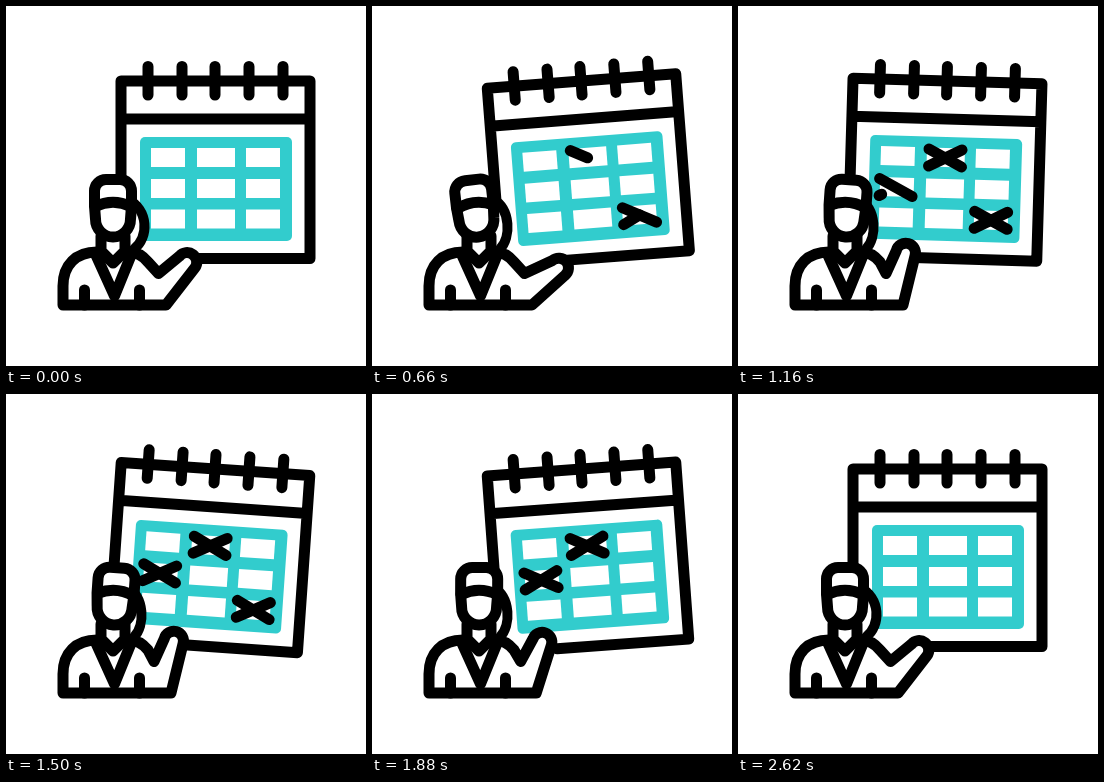
Write an HTML page that moves like this. It is 360 by 360 pixels and loops after 3 s.

```html
<!DOCTYPE html>
<html lang="en">
<head>
<meta charset="utf-8">
<title>Planning calendar</title>
<style>
html, body { margin: 0; width: 100%; height: 100%; overflow: hidden; background: #fff; }
svg { display: block; width: 100vw; height: 100vh; }
.line { fill: none; stroke: #000; stroke-width: 11; stroke-linecap: round; stroke-linejoin: round; }
.solid { fill: #fff; }
#ponytail { stroke-width: 10; }
</style>
</head>
<body>
<svg viewBox="0 0 360 360">
  <g id="calendar">
    <path class="line" d="M115 190V75H304V252.500H172M115 113H304"/>
    <path class="line" id="rings"/>
    <rect x="134" y="131" width="152" height="104" rx="5" fill="#32cccd"/>
    <g id="cells" fill="#fff"></g>
    <g id="marks"></g>
  </g>
  <g id="woman">
    <path class="line solid" id="body"/>
    <path class="line" d="M78.500 284V299M133.500 284V299"/>
    <path class="line solid" id="ponytail"/>
    <path class="line solid" d="M95 230V245L107 257L119 245V230"/>
    <path class="line" d="M89 247L108.500 290L126 247"/>
    <g id="head">
      <path class="line solid" d="M88.500 200V185A11.500 11.500 0 0 1 100 173.500H114A11.500 11.500 0 0 1 125.500 185V200L124.500 213A17.500 18 0 0 1 89.500 213Z"/>
      <path class="line" d="M89 200.500Q107 192 125 200.500"/>
    </g>
  </g>
</svg>
<script>
const LOOP = 3000;
const $ = id => document.getElementById(id);
const clamp = v => Math.min(1, Math.max(0, v));
const ease = p => p * p * (3 - 2 * p);
const ramp = (t, start, length) => ease(clamp((t - start) / length));

function add(parent, name, attrs) {
  const el = document.createElementNS("http://www.w3.org/2000/svg", name);
  for (const key in attrs) el.setAttribute(key, attrs[key]);
  return parent.appendChild(el);
}

// Keys are [time, value] pairs with an eased move between neighbours.
function track(t, keys) {
  let value = keys[0][1];
  for (let i = 1; i < keys.length; i++) {
    const [start, from] = keys[i - 1], [end, to] = keys[i];
    if (t >= start) value = from + (to - from) * ramp(t, start, end - start);
  }
  return value;
}

const swing = [[220, 0], [780, -5], [1400, 5], [1890, -4.2], [2390, 0]];
const nod = [[220, 0], [650, -6.5], [1120, 4], [1680, 4], [2160, -6], [2600, 0]];
const wave = [[220, 38], [640, 50], [1120, 15], [1720, 15], [2360, 38]];
const sway = [[220, 4], [600, 0], [2200, 0], [2600, 4]];

$("rings").setAttribute("d", [142, 176, 209, 243, 277].map(x => `M${x} 60.500V89`).join(""));
for (const y of [142, 173, 203.5])
  for (const [x, width] of [[145, 34], [191, 38], [240, 34]])
    add($("cells"), "rect", { x, y, width, height: 19 });

const STEP = 300;
const marks = [
  { x: 257, y: 213, hide: 1620 },
  { x: 209.5, y: 152, hide: 2220 },
  { x: 161, y: 183, hide: 2360 }
].map((mark, i) => ({
  ...mark,
  start: 210 + i * STEP,
  strokes: [-1, 1].map(side => ({ side, el: add($("marks"), "path", { class: "line" }) }))
}));

function drawMarks(t) {
  for (const { x, y, start, hide, strokes } of marks)
    strokes.forEach(({ side, el }, i) => {
      const p = ramp(t, start + i * STEP, STEP) * (1 - ramp(t, hide, 220));
      el.style.display = p > 0.005 ? "" : "none";
      el.setAttribute("d", `M${x - 16.5} ${y + side * 8.5}l${33 * p} ${-side * 17 * p}`);
    });
}

function drawBody(degrees) {
  const a = degrees * Math.PI / 180, s = Math.sin(a), c = Math.cos(a);
  const open = clamp((degrees - 15) / 23);
  const r = 9.7, reach = 41.5 - 2.5 * open;
  const hx = 157 + reach * s, hy = 287 - reach * c;
  const elbow = 148 + 4.5 * open, corner = 165 - 5 * open;
  $("body").setAttribute("d",
    `M57 299V280C57 259 70 246 91 246H122C132 246 138 251 142 256L${elbow} 267.5` +
    `L${hx - r * c} ${hy - r * s}A${r} ${r} 0 0 1 ${hx + r * c} ${hy + r * s}L${corner} 299Z`);
}

function drawPonytail(spread) {
  const x = 139 + spread;
  $("ponytail").setAttribute("d", `M121 193C${x} 203 ${x} 232 128 243`);
}

function draw(t) {
  $("calendar").setAttribute("transform", `rotate(${track(t, swing)} 209.5 75)`);
  $("head").setAttribute("transform", `rotate(${track(t, nod)} 107 236)`);
  drawMarks(t);
  drawBody(track(t, wave));
  drawPonytail(track(t, sway));
}

const begin = performance.now();
function tick() {
  draw((performance.now() - begin) % LOOP);
  requestAnimationFrame(tick);
}
tick();
</script>
</body>
</html>
```
